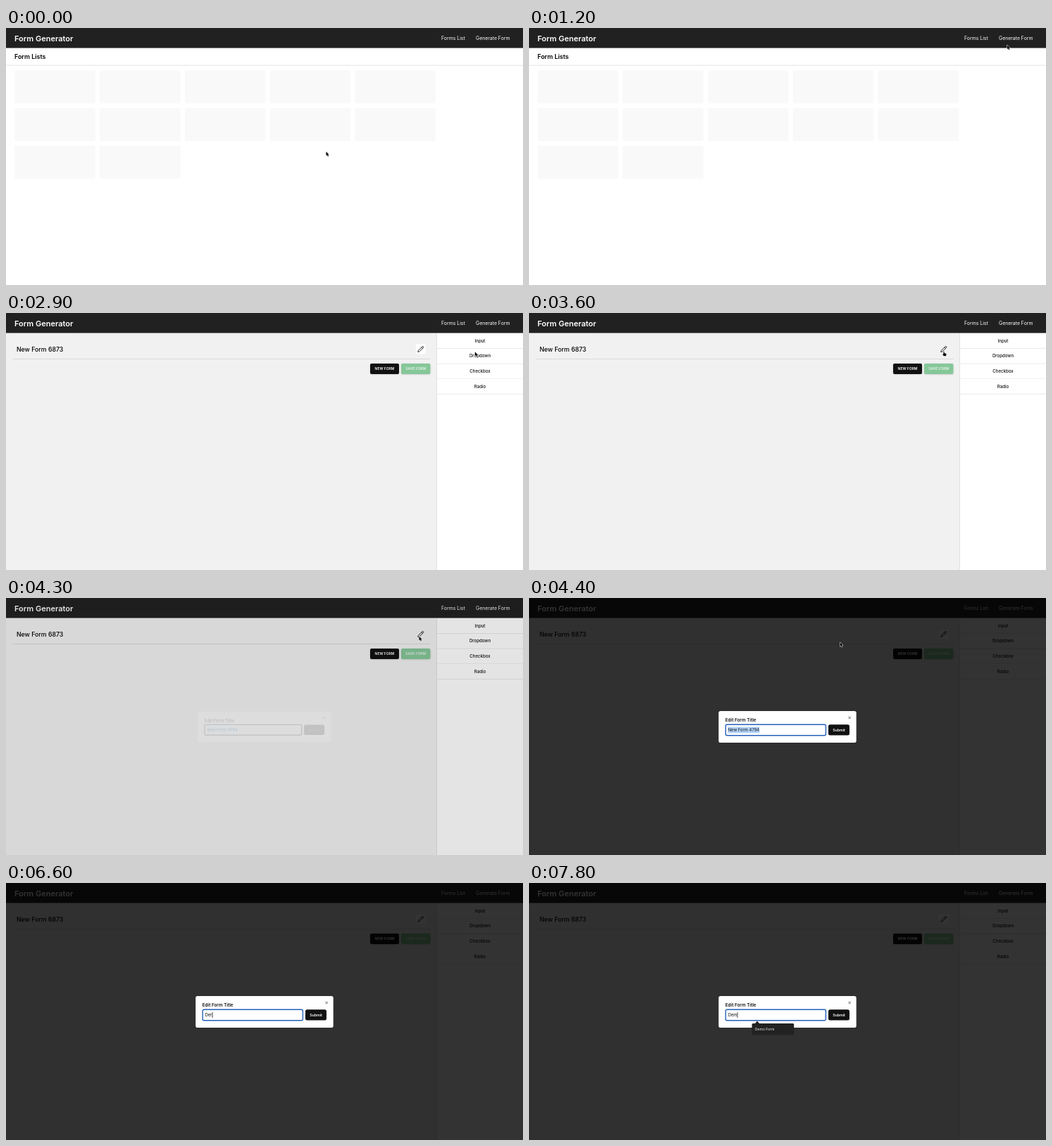
An HTML page with a canvas that plays this animation: 734x366 px, repeating every 8 s.

```html
<!DOCTYPE html>
<html lang="en">
<head>
<meta charset="utf-8">
<title>Form Generator</title>
<style>
  html, body { margin: 0; width: 100%; height: 100%; overflow: hidden; background: #fff; }
  canvas { display: block; width: 734px; height: 366px; }
</style>
</head>
<body>
<canvas id="stage"></canvas>
<script>
const W = 734, H = 366, LOOP = 8000, STEP = 100;
const OPEN = 4300, TYPE = 5800;
const canvas = document.getElementById('stage');
const ctx = canvas.getContext('2d');
const dpr = window.devicePixelRatio || 1;
canvas.width = W * dpr;
canvas.height = H * dpr;

const PENCIL = new Path2D('M21.2 6.8a1 1 0 0 0-4-4L3.8 16.2a2 2 0 0 0-.5.8l-1.3 4.4a.5.5 0 0 0 .6.6l4.4-1.3a2 2 0 0 0 .8-.5zM15 5l4 4');
const ARROW = new Path2D('M0 0V6L1.4 4.8L2.4 7L3.5 6.5L2.5 4.4H4.2Z');
const HAND = new Path2D('M1.4 .6Q2 0 2.5 .6V2.6L5 3.2Q5.6 3.5 5.5 4.3L5 6.8H2L.1 4.5Q.2 3.7 1.4 4.2Z');

// Pointer stops: time, x, y
const STOPS = [
  [100, 454.5, 176], [400, 472.5, 173], [600, 472.5, 173], [1300, 691, 15.5],
  [2200, 691, 15.5], [2300, 680, 34.5], [3000, 665, 56.5], [3100, 665, 56.5],
  [3600, 587, 54.5], [4300, 586.5, 54.5], [4400, 441.5, 63], [4900, 350, 158]
];

// Input content from each time on
const TYPED = [[5800, 'D'], [6100, 'De'], [6500, 'Der'], [7400, 'De'], [7800, 'Dem']];

function box(x, y, w, h, fill, r = 0) {
  ctx.beginPath();
  ctx.roundRect(x, y, w, h, r);
  ctx.fillStyle = fill;
  ctx.fill();
}

// Text whose capitals are centred on cy
function label(str, x, cy, size, weight = 400, fill = '#111', align = 'left') {
  ctx.font = `${weight} ${size}px Inter, sans-serif`;
  ctx.textAlign = align;
  ctx.fillStyle = fill;
  ctx.fillText(str, x, cy + size * 0.364);
}

function withShadow(color, blur, dy, draw) {
  ctx.save();
  ctx.shadowColor = color;
  ctx.shadowBlur = blur * dpr;
  ctx.shadowOffsetY = dy * dpr;
  draw();
  ctx.restore();
}

function pointer(t) {
  let a = STOPS[0];
  if (t <= a[0]) return { x: a[1], y: a[2] };
  for (const b of STOPS) {
    if (t < b[0]) {
      const p = (t - a[0]) / (b[0] - a[0]);
      const k = p * p * (3 - 2 * p);
      return { x: a[1] + (b[1] - a[1]) * k, y: a[2] + (b[2] - a[2]) * k };
    }
    a = b;
  }
  return { x: a[1], y: a[2] };
}

const inside = (p, x, y, w, h) => p.x >= x && p.x <= x + w && p.y >= y && p.y <= y + h;

function header() {
  box(0, 0, W, 28.5, '#212121');
  label('Form Generator', 12, 14.5, 11, 600, '#fff');
  label('Forms List', 618, 14.5, 6.9, 400, '#fff');
  label('Generate Form', 667, 14.5, 6.9, 400, '#fff');
}

function listPage() {
  label('Form Lists', 12, 41, 8.9, 600, '#000');
  box(0, 52.8, W, 0.8, '#d9d9d9');
  for (let i = 0; i < 12; i++) {
    box(12.3 + (i % 5) * 120.8, 60.2 + Math.floor(i / 5) * 53.7, 114.5, 47, '#f9f9f9', 2);
  }
}

function button(str, x, w, fill, color) {
  withShadow('rgba(0,0,0,.2)', 2, 0.5, () => box(x, 72, w, 15, fill, 2));
  label(str, x + w / 2, 79.6, 5, 600, color, 'center');
}

function builderPage(pencilHover) {
  box(0, 28.5, 611.5, H, '#f1f1f1');
  box(611, 28.5, 0.8, H, '#dcdcdc');
  label('New Form 6873', 15, 51.5, 8.75, 500, '#000');
  box(9.5, 65, 593, 0.8, '#d2d2d2');
  if (!pencilHover) box(581.8, 44.3, 14.2, 14.2, '#fff', 2);

  ctx.save();
  ctx.translate(584, 46.7);
  ctx.scale(0.4, 0.4);
  ctx.lineWidth = 2.2;
  ctx.lineCap = ctx.lineJoin = 'round';
  ctx.strokeStyle = '#111';
  ctx.stroke(PENCIL);
  ctx.restore();

  button('NEW FORM', 517, 41, '#111', '#fff');
  button('SAVE FORM', 561, 41.4, '#86c799', '#e6f4ea');
  ['Input', 'Dropdown', 'Checkbox', 'Radio'].forEach((name, i) => {
    label(name, 673, 39.4 + i * 21.7, 6.1, 500, '#111', 'center');
    box(612, 50 + i * 21.7, 122, 0.7, '#e3e3e3');
  });
}

function statusBar() {
  box(0, 359, 66.5, 7, '#2b2b2b', [0, 1.5, 0, 0]);
  label('localhost:5173/generateform', 1.8, 362.6, 4.55, 400, '#e8e8e8');
}

function inputText(t) {
  if (t < TYPE) {
    box(282.5, 183.5, 44.8, 9, '#b3d4fb');
    label('New Form 4794', 282.7, 188, 5.85);
    return;
  }
  const str = TYPED.filter(s => s[0] <= t).pop()[1];
  label(str, 282.7, 188, 5.85);
  const caretOn = t < 7100 || t >= 7400;
  if (caretOn) box(282.9 + ctx.measureText(str).width, 184, 0.7, 8, '#000');
}

function suggestion() {
  ctx.beginPath();
  ctx.moveTo(320.5, 200.5);
  ctx.lineTo(324, 196.5);
  ctx.lineTo(327.5, 200.5);
  ctx.fillStyle = '#222';
  ctx.fill();
  box(316.5, 200, 59.7, 16.5, '#222', 1.5);
  label('Demo Form', 321, 208.4, 5, 400, '#f2f2f2');
}

function dialog(t) {
  const opening = t < OPEN + STEP;
  const alpha = opening ? 0.13 : 1;
  const scale = opening ? 0.967 : 1;
  box(0, 0, W, H, `rgba(0,0,0,${0.8 * alpha})`);

  ctx.save();
  ctx.globalAlpha = alpha;
  ctx.translate(367, 183.5);
  ctx.scale(scale, scale);
  ctx.translate(-367, -183.5);
  box(269.2, 161, 195.5, 45, '#fff', 2.8);
  label('Edit Form Title', 278.8, 174, 6.3, 600, '#111');

  ctx.lineWidth = 0.8;
  ctx.strokeStyle = '#444';
  ctx.beginPath();
  ctx.moveTo(453.5, 168.8);
  ctx.lineTo(456.9, 172.2);
  ctx.moveTo(456.9, 168.8);
  ctx.lineTo(453.5, 172.2);
  ctx.stroke();

  ctx.beginPath();
  ctx.roundRect(279.2, 180.3, 142.2, 15.4, 2);
  ctx.lineWidth = 1.4;
  ctx.strokeStyle = opening ? '#111' : '#2461ba';
  ctx.stroke();
  inputText(t);

  box(425, 180.3, 30, 15.2, '#111', 2.5);
  label('Submit', 440, 188, 5.2, 600, '#fff', 'center');
  ctx.restore();

  if (t >= TYPE && (t < 6600 || t >= 7500)) suggestion();
}

function drawPointer(p, hand) {
  const shape = hand ? HAND : ARROW;
  ctx.save();
  ctx.translate(p.x, p.y);
  ctx.lineWidth = 1;
  ctx.lineJoin = 'round';
  ctx.strokeStyle = '#fff';
  ctx.stroke(shape);
  ctx.fillStyle = '#000';
  ctx.fill(shape);
  ctx.restore();
}

function render(t) {
  const p = pointer(t);
  const onLink = inside(p, 662, 8, 58, 15);
  const onPencil = inside(p, 581, 43, 16, 17);
  ctx.setTransform(dpr, 0, 0, dpr, 0, 0);
  box(0, 0, W, H, '#fff');
  if (t < 1500) listPage();
  else builderPage(onPencil);
  header();
  if (t >= 1500 && t < 2600) statusBar();
  if (t >= OPEN) dialog(t);
  if (t < TYPE) drawPointer(p, t < OPEN && (onLink || onPencil));
}

const start = performance.now();
function tick() {
  const t = (performance.now() - start) % LOOP;
  render(Math.floor(t / STEP) * STEP);
  requestAnimationFrame(tick);
}
tick();
</script>
</body>
</html>
```
